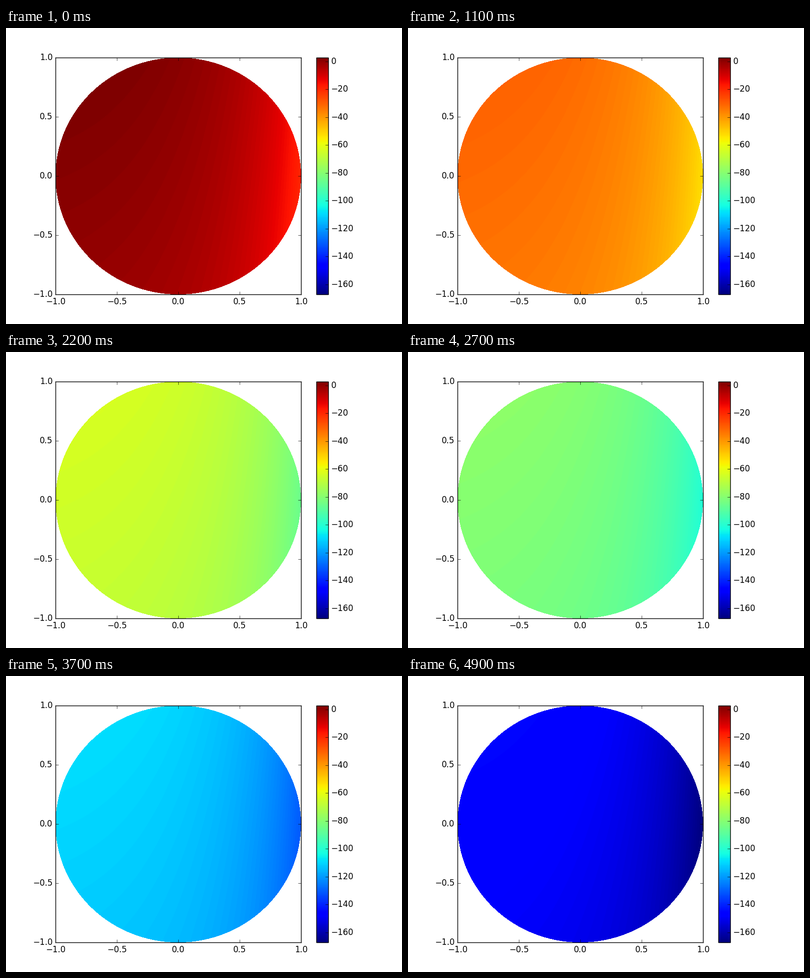
These frames come from a looping animation (800x600 px, 5000 ms). A matplotlib script:

```python
import numpy as np
import matplotlib.pyplot as plt
from matplotlib.animation import FuncAnimation

plt.style.use("classic")
plt.rcParams.update({
    "figure.dpi": 100,
    "savefig.dpi": 100,
    "figure.facecolor": "white",
    "savefig.facecolor": "white",
    "font.family": "DejaVu Sans",
    "font.size": 12,
})

FRAMES = 50
INTERVAL = 100
VMIN, VMAX = -167.2, 2.8
WIDTH, HEIGHT = 496, 480


def disc_profile():
    """Field on the unit disc, shifted so that its maximum is zero."""
    x = (np.arange(WIDTH) + 0.5) / WIDTH * 2 - 1
    y = (np.arange(HEIGHT) + 0.5) / HEIGHT * 2 - 1
    x, y = np.meshgrid(x, y)
    field = 2.2 * y - 3.05 * np.exp(1.95 * x)
    field = np.ma.masked_where(x**2 + y**2 > 1, field)
    return field - field.max()


profile = disc_profile()
# The lowest value reaches the bottom of the scale in the last frame.
drift = (VMAX - VMIN + profile.min()) / (FRAMES - 1)


def values(frame):
    return profile + VMAX - drift * frame


fig = plt.figure(figsize=(8, 6), dpi=100)
ax = fig.add_axes([100 / 800, 0.1, WIDTH / 800, 0.8])
image = ax.imshow(values(0), cmap="jet", vmin=VMIN, vmax=VMAX,
                  extent=(-1, 1, -1, 1), origin="lower",
                  aspect="auto", interpolation="nearest")
ticks = np.linspace(-1, 1, 5)
ax.set_xticks(ticks)
ax.set_yticks(ticks)

bar_ax = fig.add_axes([627 / 800, 0.1, 24 / 800, 0.8])
bar = fig.colorbar(image, cax=bar_ax, ticks=np.arange(-160, 1, 20))
bar.ax.tick_params(direction="in", left=False, right=True)
bar.ax.minorticks_off()


def update(frame):
    image.set_data(values(frame))
    return [image]


anim = FuncAnimation(fig, update, frames=FRAMES, interval=INTERVAL,
                     repeat=True, repeat_delay=0, blit=False)
plt.show()
```
